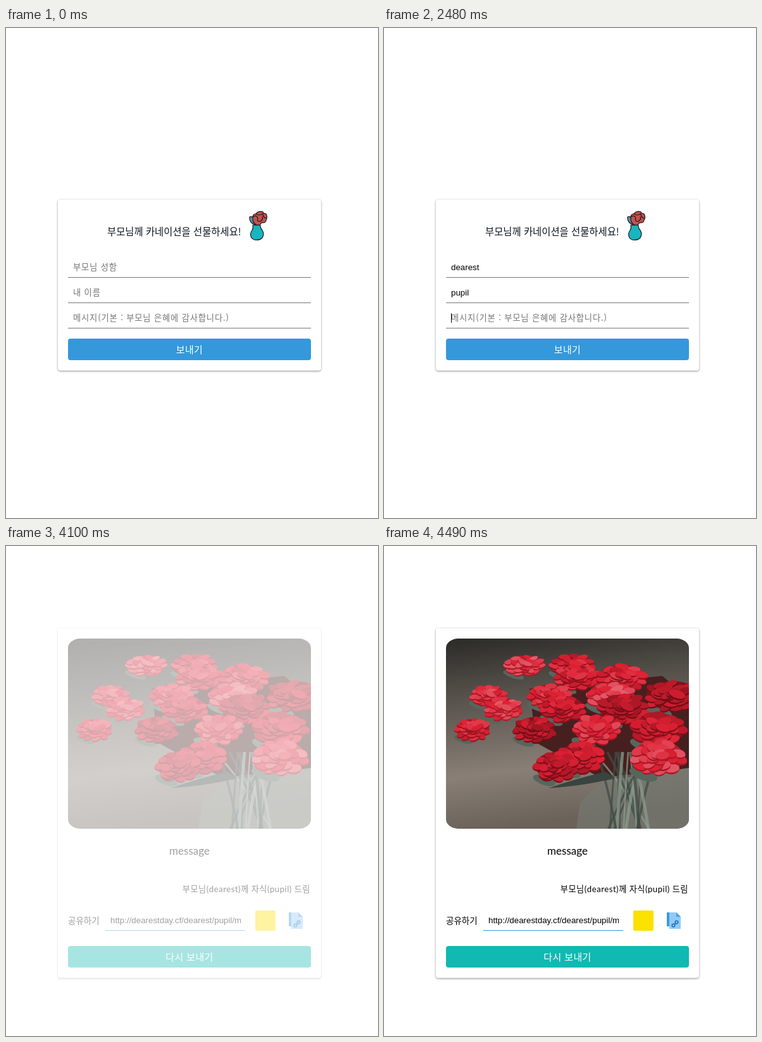
Animation of 588x773 px, one loop 5350 ms. Source, as an HTML page:

```html
<!DOCTYPE html>
<html lang="ko">
<head>
<meta charset="utf-8">
<title>카네이션 선물</title>
<style>
html, body { margin: 0; width: 100%; height: 100%; overflow: hidden; background: #fff; }
svg { display: block; }
text { font: 13.333px "Liberation Sans", Arial, sans-serif; white-space: pre; }
.ko { font-family: "Noto Sans CJK KR", "Noto Sans CJK JP", "Noto Sans CJK", sans-serif; }
.hint { letter-spacing: .8px; fill: #757575; }
.button { font-size: 15px; letter-spacing: .4px; fill: #fff; text-anchor: middle; }
.hand { font-family: Lato, "Noto Sans CJK KR", "Noto Sans CJK JP", "Noto Sans CJK", sans-serif; }
.card { fill: #fff; filter: drop-shadow(0 1px 1.5px rgba(0, 0, 0, .45)); }
</style>
</head>
<body>
<svg width="588" height="773" viewBox="0 0 588 773">
  <defs>
    <clipPath id="frame"><rect x="98" y="146" width="384" height="300" rx="19.2" ry="15"/></clipPath>
    <clipPath id="loaded"><rect id="loadedBox" x="98" y="146" width="384" height="300"/></clipPath>
    <linearGradient id="wall" x2=".15" y2="1">
      <stop offset="0" stop-color="#2b2a27"/><stop offset=".3" stop-color="#55504a"/>
      <stop offset=".72" stop-color="#897f76"/><stop offset="1" stop-color="#6b625a"/>
    </linearGradient>
  </defs>

  <g id="form">
    <rect class="card" x="82" y="270.5" width="416" height="270" rx="4"/>
    <text class="ko" x="160" y="326.5" style="font-size:15.4px;font-weight:500" fill="#0c1420">부모님께 카네이션을 선물하세요!</text>
    <g stroke="#161616" stroke-width="1.2" stroke-linejoin="round" stroke-linecap="round">
      <path d="M394 311Q384 307 385 298Q391 296 394 304Z" fill="#5c93ad"/>
      <path d="M397 311Q389 308 390 299Q390 293 395 293Q399 288 406 290Q407 293 411 293Q414 298 411 303Q411 308 404 307Q401 312 397 311Z" fill="#c4524f"/>
      <path d="M395 293Q400 297 406 293Q406 299 411 300M390 298Q396 294 398 300Q396 306 402 305Q407 302 405 298" fill="none"/>
      <path d="M390 311H402Q402 316 405 319Q409 325 405 331Q402 334.5 396 334.5Q390 334.5 387.5 330Q385 324 389 319Q391 316 390 311Z" fill="#18b4bf"/>
    </g>
    <path d="M98 393.5H482M98 433.5H482M98 473.5H482" stroke="#777"/>
    <g id="fields"></g>
    <rect id="caret" width="1" height="15"/>
    <rect x="98" y="490" width="384" height="34" rx="4" fill="#3498db"/>
    <text class="ko button" x="290" y="512.5">보내기</text>
  </g>

  <g id="result">
    <rect class="card" x="82" y="129.5" width="416" height="552" rx="4"/>
    <g clip-path="url(#frame)"><g id="photo" clip-path="url(#loaded)"></g></g>
    <text class="hand" x="290" y="486.5" text-anchor="middle" style="font-size:17px">message</text>
    <text class="hand" x="481" y="545.5" text-anchor="end" style="font-size:13.2px;letter-spacing:.5px">부모님(dearest)께 자식(pupil) 드림</text>
    <text class="hand" x="98" y="596" style="font-size:13.5px">공유하기</text>
    <svg x="165" y="575" width="206" height="30"><text y="20">http://dearestday.cf/dearest/pupil/message</text></svg>
    <path d="M157 606.5H378" stroke="#3498db"/>
    <rect x="394" y="575" width="32" height="32" rx="2" fill="#fae100"/>
    <path d="M447 578H460V600H447Z" fill="#3f97dc"/>
    <path d="M451 578H462L469 585V604H451Z" fill="#90cbf7"/>
    <path d="M462 578L469 585H462Z" fill="#4ba0e0"/>
    <g fill="none" stroke="#1c6fc0" stroke-width="1.6">
      <circle cx="457.5" cy="598.5" r="2.3"/><circle cx="462.5" cy="593.5" r="2.3"/>
      <path d="M458.5 597.5L461.5 594.5"/>
    </g>
    <rect x="98" y="631" width="384" height="34" rx="4" fill="#10b9b2"/>
    <text class="ko button" x="290" y="653.5">다시 보내기</text>
  </g>
</svg>
<script>
const $ = id => document.getElementById(id);
const LOOP = 5350, STEP = 76, REVEAL = 3950;

// Each burst starts at a time and types one chunk per step.
const fields = [
  { hint: '부모님 성함', focus: 380, bursts: { 460: 'd', 610: 'e a r', 930: 'e s t' } },
  { hint: '내 이름', focus: 1480, bursts: { 1860: 'p', 2010: 'up i l' } },
  { hint: '메시지(기본 : 부모님 은혜에 감사합니다.)', focus: 2480, bursts: { 2780: 'm e', 3090: 's', 3240: 's a g e' } }
];

const typedAt = (bursts, t) => Object.entries(bursts).map(([start, chunks]) =>
  chunks.split(' ').filter((_, i) => t >= +start + i * STEP).join('')).join('');

function drawPhoto() {
  let seed = 7;
  const rand = () => (seed = seed * 16807 % 2147483647) / 2147483647;
  const red = l => `hsl(354 ${Math.round(84 - l * .2)}% ${l.toFixed(1)}%)`;
  const oval = (x, y, rx, ry, turn, fill) =>
    `<ellipse rx="${rx}" ry="${ry}" fill="${fill}" transform="translate(${x} ${y}) rotate(${turn})"/>`;

  function flower(x, y) {
    const w = 22 + x / 18, h = w * (.5 + (y - 188) / 900), light = 40 + rand() * 16;
    let art = oval(x - w * .5, y + h * .9, w * .5, h * .3, 18, '#56665d') +
      oval(x, y, w * .88, h * .88, 0, red(light - 12));
    for (let ring = .74; ring > .1; ring -= .28) {
      const count = Math.round(4 + ring * 10);
      for (let i = 0; i < count; i++) {
        const a = (i + rand() * .7) * 2 * Math.PI / count;
        const px = x + Math.cos(a) * w * ring, py = y + Math.sin(a) * h * ring;
        const size = .2 + rand() * .09, turn = rand() * 50 - 25;
        art += oval(px, py + 1.5, w * size, h * size, turn, red(light - 16));
        art += oval(px, py, w * size, h * size * .85, turn, red(light - 6 + rand() * 14));
      }
    }
    return art;
  }

  let art = '<rect x="98" y="146" width="384" height="300" fill="url(#wall)"/>' +
    '<path d="M230 225L440 205L482 240V350L350 370L240 310Z" fill="#45201f"/>' +
    '<path d="M310 405Q345 365 370 362L482 352V446H304Z" fill="#767a72" opacity=".65"/>';
  for (let i = 0; i < 16; i++) {
    const x = 330 + rand() * 110, foot = 345 + rand() * 80;
    art += `<path d="M${x} 325Q${(x + foot) / 2} 370 ${foot} 446" fill="none" opacity=".75"
      stroke="${i % 3 ? '#414b44' : '#8a9b8d'}" stroke-width="${2 + rand() * 3}"/>`;
  }
  art += '<path d="M260 382Q300 368 350 356L365 366Q320 378 260 382Z" fill="#3a443e"/>';

  // Rows from back to front: y, first x, spacing, count
  const rows = [[188, 222, 76, 2], [207, 305, 70, 2], [236, 165, 97, 4], [256, 188, 95, 3],
                [289, 140, 98, 4], [333, 312, 121, 2], [347, 272, 0, 1]];
  for (const [y, x, gap, count] of rows)
    for (let i = 0; i < count; i++) art += flower(x + i * gap, y);
  $('photo').innerHTML = art;
}

function setup() {
  $('fields').innerHTML = fields.map((f, i) => `<text x="106" y="${382 + 40 * i}"></text>`).join('');
  const texts = $('fields').querySelectorAll('text');
  fields.forEach((f, i) => f.text = texts[i]);
  drawPhoto();
}

function drawForm(t) {
  fields.forEach(f => {
    f.typed = typedAt(f.bursts, t);
    f.text.textContent = f.typed || f.hint;
    f.text.setAttribute('class', f.typed ? '' : 'ko hint');
  });
  const active = fields.filter(f => t >= f.focus).pop();
  $('caret').style.display = active ? '' : 'none';
  if (!active) return;
  const width = active.typed ? active.text.getComputedTextLength() : 0;
  $('caret').setAttribute('x', Math.floor(106 + width));
  $('caret').setAttribute('y', active.text.getAttribute('y') - 12);
}

function drawResult(t) {
  const step = Math.floor((t - REVEAL) / 75);
  $('result').style.opacity = Math.min(1, .035 + step / 6);
  $('loadedBox').setAttribute('height', step ? 300 : 66);
}

function draw(now) {
  const t = now % LOOP, sent = t >= REVEAL;
  $('form').style.display = sent ? 'none' : '';
  $('result').style.display = sent ? '' : 'none';
  (sent ? drawResult : drawForm)(t);
}

setup();
const start = performance.now();
const tick = () => {
  draw(performance.now() - start);
  requestAnimationFrame(tick);
};
tick();
</script>
</body>
</html>
```
